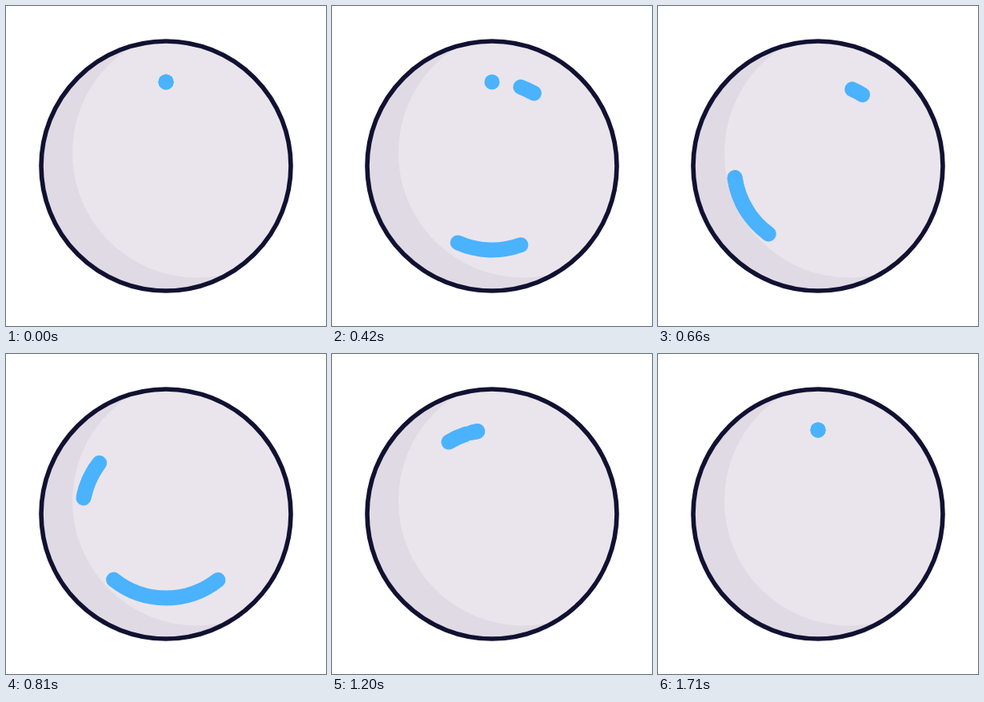
Animation, 400 px wide and 400 px high, one loop 1770 ms. Source, as an HTML page:

```html
<!DOCTYPE html>
<html lang="en">
<head>
<meta charset="utf-8">
<title>Loader</title>
<style>
  html, body { margin: 0; width: 100%; height: 100%; overflow: hidden; background: #fff; }
  svg { display: block; width: 100vw; height: 100vh; }
  .dash { fill: none; stroke: #4bb2fd; stroke-width: 19; stroke-linecap: round; }
</style>
</head>
<body>
<svg viewBox="0 0 400 400">
  <clipPath id="disc"><circle cx="200" cy="200" r="156"/></clipPath>
  <circle cx="200" cy="200" r="156" fill="#e0dae4"/>
  <circle cx="239" cy="183.5" r="156" fill="#eae5ec" clip-path="url(#disc)"/>
  <circle cx="200" cy="200" r="156" fill="none" stroke="#111132" stroke-width="5.6"/>
  <path class="dash"/>
  <path class="dash"/>
  <path class="dash"/>
</svg>
<script>
  const LOOP = 1770, STEP = 30, LAST = 1710, RADIUS = 105;

  // [time in ms, degrees clockwise from the top]
  const dashes = [
    {
      head: [[0, 0], [90, 9], [210, 54], [420, 204], [660, 262], [960, 334], [1200, 350], [1680, 360]],
      tail: [[0, 0], [90, 4], [210, 33], [420, 160], [660, 236], [960, 320], [1200, 346], [1680, 360]]
    },
    {
      head: [[240, 0], [420, 30], [540, 180], [660, 262], [960, 334], [1200, 350], [1680, 360]],
      tail: [[240, 0], [420, 20], [540, 98], [660, 216], [960, 320], [1200, 346], [1680, 360]]
    },
    {
      head: [[480, 0], [660, 32], [790, 203], [960, 300], [1200, 342], [1680, 360]],
      tail: [[480, 0], [660, 24], [790, 125], [960, 263], [1200, 329], [1680, 360]]
    }
  ];

  // Smooth curve through the keys that never runs backwards
  function curve(keys) {
    const n = keys.length;
    const slope = i => (keys[i + 1][1] - keys[i][1]) / (keys[i + 1][0] - keys[i][0]);
    const tangent = keys.map((k, i) => {
      if (i === 0 || i === n - 1) return 0;
      const a = slope(i - 1), b = slope(i);
      return 2 * a * b / (a + b);
    });
    return t => {
      if (t <= keys[0][0]) return keys[0][1];
      if (t >= keys[n - 1][0]) return keys[n - 1][1];
      let i = 0;
      while (t > keys[i + 1][0]) i++;
      const [t0, y0] = keys[i], [t1, y1] = keys[i + 1];
      const h = t1 - t0, u = (t - t0) / h, v = 1 - u;
      return y0 * v * v * (1 + 2 * u) + y1 * u * u * (3 - 2 * u)
        + h * u * v * (tangent[i] * v - tangent[i + 1] * u);
    };
  }

  function point(deg) {
    const a = deg * Math.PI / 180;
    return (200 + RADIUS * Math.sin(a)).toFixed(3) + " " + (200 - RADIUS * Math.cos(a)).toFixed(3);
  }

  const paths = document.querySelectorAll(".dash");
  const tracks = dashes.map(d => ({ head: curve(d.head), tail: curve(d.tail) }));

  function draw(t) {
    tracks.forEach(({ head, tail }, i) => {
      const from = tail(t), to = Math.max(head(t), from + 0.02);
      paths[i].setAttribute("d", `M${point(from)}A${RADIUS} ${RADIUS} 0 0 1 ${point(to)}`);
    });
  }

  const start = performance.now();
  function tick() {
    const t = Math.max(0, performance.now() - start) % LOOP;
    draw(Math.min(LAST, Math.floor(t / STEP) * STEP));
    requestAnimationFrame(tick);
  }
  tick();
</script>
</body>
</html>
```
